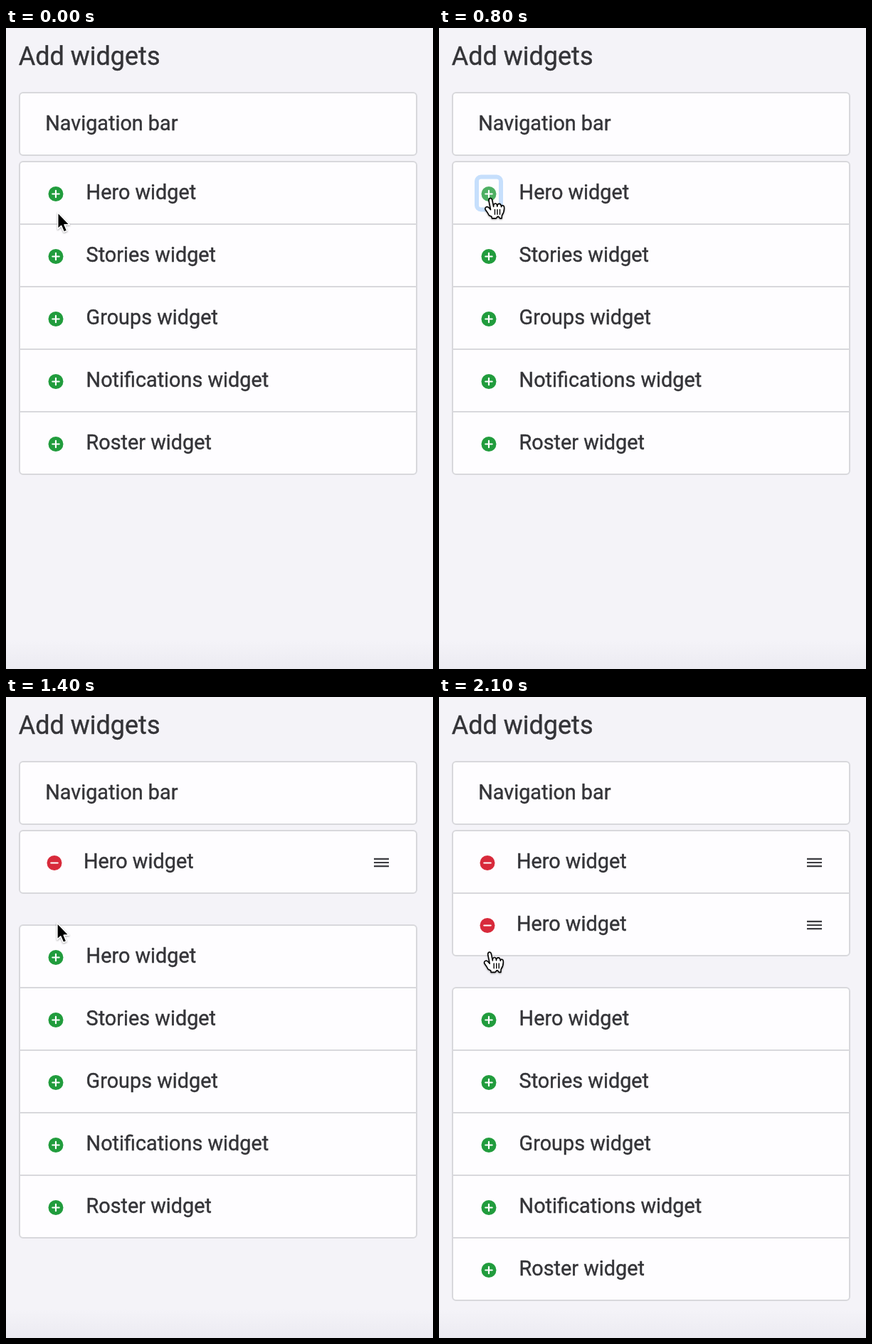
These frames come from a looping animation (600x902 px, 2.2 s). An HTML page:

```html
<!DOCTYPE html>
<html lang="en">
<head>
<meta charset="utf-8">
<title>Add widgets</title>
<style>
  html, body { margin: 0; width: 100%; height: 100%; overflow: hidden; background: #f4f3f8; }
  svg { display: block; width: 600px; height: 902px; }
  text { font: 28.8px Roboto, sans-serif; fill: #343438; stroke: #343438; stroke-width: .4; }
  .title { font-size: 36px; }
  .footer { fill: #606067; stroke: #606067; }
  .box { fill: #fefdff; stroke: #d8d8dc; stroke-width: 2; }
  .add { fill: #219c3d; }
  .remove { fill: #d82a3b; }
  .sign { stroke: #fff; stroke-width: 2.2; stroke-linecap: round; }
  .grip { stroke: #3c3c40; stroke-width: 2.2; }
  .ring { fill: none; stroke: #c6dffc; stroke-width: 6; }
  .pointer { filter: drop-shadow(0 1.5px 1.2px rgba(0, 0, 0, .35)); }
</style>
</head>
<body>
<svg viewBox="0 0 600 902">
  <defs>
    <linearGradient id="fade" x1="0" y1="0" x2="0" y2="1">
      <stop offset="0" stop-color="#e9e8ef" stop-opacity="0"/>
      <stop offset="1" stop-color="#e9e8ef" stop-opacity=".75"/>
    </linearGradient>
  </defs>
  <rect width="600" height="902" fill="#f4f3f8"/>
  <rect y="862" width="600" height="40" fill="url(#fade)"/>
  <text class="title" x="17.7" y="52">Add widgets</text>
  <rect class="box" x="19" y="91" width="558" height="88" rx="5"/>
  <text x="55.2" y="144">Navigation bar</text>
  <g id="chosen"></g>
  <g id="list"></g>
  <text id="footer" class="footer" x="349.5" y="906.5">© 2020 LunFex | release</text>
  <g class="pointer">
    <path id="arrow" d="M0 0V23.4L4.9 18.8L8.6 27.5L13 25.7L9.4 17.2H16.6Z"
      fill="#000" stroke="#fff" stroke-width="1.6" stroke-linejoin="round"/>
    <g id="hand" stroke="#000" stroke-linecap="round" stroke-linejoin="round">
      <path fill="#fff" stroke-width=".85" d="M11.3 20.4L10.1 18.4L8.7 16.6C7.9 15.2 9.6 13.6 11.3 15.1
        L12.6 16.5L11.3 10.6C10.9 8 13.2 7.8 13.8 9.8L14.8 14.4C14.6 11.6 17.4 11.4 17.6 14.3
        C17.7 11.7 20.5 11.7 20.7 14.5C21 13.1 22.9 13.2 22.9 15.2C23 17.5 22.6 18.8 21.2 20.5
        L21 22.6H19.6L18.6 21.4H17.9L16.8 22.6H13.6L13.4 21.4Z"/>
      <path fill="none" stroke-width=".75" d="M15.8 16.4V19.8M17.7 16.4V19.8M19.6 16.4V19.8"/>
    </g>
  </g>
</svg>
<script>
const LOOP = 2200, STEP = 100, ROW = 88, TOP = 187;
const names = ['Hero', 'Stories', 'Groups', 'Notifications', 'Roster'];
const $ = id => document.getElementById(id);

const panel = rows =>
  `<rect class="box" x="19" y="1" width="558" height="${rows * ROW}" rx="5"/>` +
  Array.from({ length: rows - 1 }, (_, i) =>
    `<path class="box" d="M19 ${(i + 1) * ROW + 1}H577"/>`).join('');

const icon = (kind, x, y) => `<g class="icon">
  <circle class="${kind}" cx="${x}" cy="${y}" r="10.5"/>
  <path class="sign" d="M${x - 4.7} ${y}h9.4${kind === 'add' ? `M${x} ${y - 4.7}v9.4` : ''}"/></g>`;

const addRow = (name, i) => icon('add', 70, i * ROW + 46.5) +
  `<text x="112.6" y="${i * ROW + 54}">${name} widget</text>`;

const chosenRow = i => {
  const y = i * ROW + 46;
  return icon('remove', 68, y + .5) +
    `<text x="109" y="${y + 8}">Hero widget</text>
     <path class="grip" d="M517 ${y - 5.2}h21m-21 5.2h21m-21 5.2h21"/>`;
};

$('list').innerHTML = panel(names.length) + names.map(addRow).join('') +
  '<rect id="ring" class="ring" x="53" y="22.5" width="34" height="46" rx="6"/>';
// The ring sits below the icons
$('list').insertBefore($('ring'), $('list').querySelector('.icon'));
const addIcon = $('list').querySelector('.icon');
const show = (el, on) => el.setAttribute('opacity', +on);
const within = (t, from, to) => t >= from && t < to;
const place = (el, x, y, more = '') => el.setAttribute('transform', `translate(${x} ${y})${more}`);

const glide = (t, from, to) => {
  const p = Math.min(1, Math.max(0, (t - from) / (to - from)));
  return p * p * (3 - 2 * p);
};

let count = -1;
function setChosen(n) {
  if (n === count) return;
  count = n;
  $('chosen').innerHTML = n ? panel(n) + Array.from({ length: n }, (_, i) => chosenRow(i)).join('') : '';
  place($('chosen'), 0, TOP);
  place($('list'), 0, n ? TOP + 45 + n * ROW : TOP);
}

function ringLevel(t) {
  if (within(t, 600, 900)) return Math.min(1, (t - 500) / 200);
  return within(t, 1800, 2000) ? 1 : 0;
}

function draw(now) {
  const t = Math.floor(now % LOOP / STEP) * STEP;
  setChosen(t < 900 ? 0 : t < 2000 ? 1 : 2);

  show($('ring'), ringLevel(t));
  show(addIcon, within(t, 200, 900) || within(t, 1500, 2000) ? .8 : 1);
  const removeIcon = $('chosen').querySelector('.icon');
  if (removeIcon) show(removeIcon, within(t, 900, 1300) ? .8 : 1);
  show($('footer'), within(t, 900, 1000));

  const x = 72 - 1.3 * glide(t, 1100, 1600);
  const y = 258 - 19 * glide(t, 0, 400) + 119.5 * glide(t, 1100, 1600);
  const hand = within(t, 200, 1300) || t >= 1500;
  show($('hand'), hand);
  show($('arrow'), !hand);
  place($('arrow'), x + .7, y + 1.5);
  place($('hand'), x - 7.2, y + .4, ' scale(1.85 2) translate(-8.4 -8.4)');
}

const start = performance.now();
function tick() {
  draw(performance.now() - start);
  requestAnimationFrame(tick);
}
tick();
</script>
</body>
</html>
```
